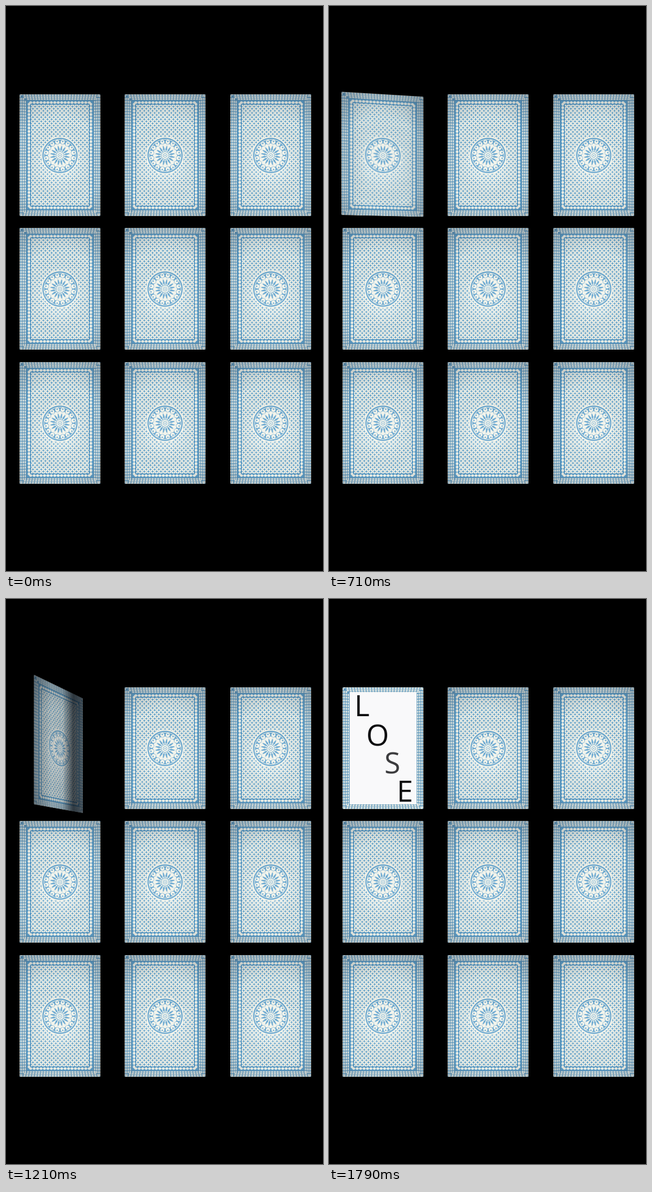
These frames come from a looping animation (561 px wide and 998 px high, 1830 ms). An HTML page with a canvas:

```html
<!DOCTYPE html>
<html lang="en">
<head>
<meta charset="utf-8">
<title>Card flip</title>
<style>
  html, body { margin: 0; width: 100%; height: 100%; overflow: hidden; background: #000; }
  #stage {
    position: relative; width: 561px; height: 998px; overflow: hidden; background: #000;
    perspective: 1050px; perspective-origin: 280.5px 499px;
  }
  .card { position: absolute; width: 143px; height: 215px; }
  .card canvas, .side, .shade, svg { position: absolute; left: 0; top: 0; width: 143px; height: 215px; }
  .side { backface-visibility: hidden; border-radius: 1px; overflow: hidden; }
  #flip { transform-style: preserve-3d; }
  #front { transform: rotateY(180deg); }
  text { font: 51.5px "Open Sans", "Noto Sans", sans-serif; fill: #0c0c0e; }
</style>
</head>
<body>
<div id="stage">
  <div id="flip" class="card">
    <div id="back" class="side"><div class="shade"></div></div>
    <div id="front" class="side">
      <svg viewBox="0 0 143 215">
        <text x="21" y="51">L</text>
        <text x="42" y="102.5">O</text>
        <text x="74" y="152" style="fill:#3c3c3e">S</text>
        <text x="96" y="201.5">E</text>
      </svg>
      <div class="shade"></div>
    </div>
  </div>
</div>
<script>
const W = 143, H = 215, SCALE = 2;
const BLUE = '#5b9fcb', CREAM = '#f2f3e9';
const COLS = [24, 210, 396.5], ROWS = [155.5, 392, 628.5];
const LOOP = 1830, FRAME = 1000 / 24, START = 360, END = 1790;
const $ = id => document.getElementById(id);

function makeCanvas(paint) {
  const c = document.createElement('canvas');
  c.width = W * SCALE;
  c.height = H * SCALE;
  const g = c.getContext('2d');
  g.scale(SCALE, SCALE);
  paint(g);
  return c;
}

// Leaf from one point to another, bulging by b on each side.
function leaf(g, x1, y1, x2, y2, b) {
  const mx = (x1 + x2) / 2, my = (y1 + y2) / 2;
  const len = Math.hypot(x2 - x1, y2 - y1);
  const nx = (y1 - y2) / len * b, ny = (x2 - x1) / len * b;
  g.beginPath();
  g.moveTo(x1, y1);
  g.quadraticCurveTo(mx + nx, my + ny, x2, y2);
  g.quadraticCurveTo(mx - nx, my - ny, x1, y1);
  g.fill();
}

function disc(g, x, y, r, color) {
  g.fillStyle = color;
  g.beginPath();
  g.arc(x, y, r, 0, Math.PI * 2);
  g.fill();
}

function ring(g, r, width, color) {
  g.strokeStyle = color;
  g.lineWidth = width;
  g.beginPath();
  g.arc(0, 0, r, 0, Math.PI * 2);
  g.stroke();
}

// Row of leaves running round the card, dx and dy from its edges.
function chain(g, dx, dy, pitch, bulge, shift = 0) {
  g.fillStyle = CREAM;
  const w = W - 2 * dx, h = H - 2 * dy;
  const nx = Math.round(w / pitch), ny = Math.round(h / pitch);
  for (let i = 0; i < nx; i++) {
    const x = dx + (i + shift) * w / nx, e = x + w / nx;
    leaf(g, x, dy, e, dy, bulge);
    leaf(g, x, H - dy, e, H - dy, bulge);
  }
  for (let i = 0; i < ny; i++) {
    const y = dy + (i + shift) * h / ny, e = y + h / ny;
    leaf(g, dx, y, dx, e, bulge);
    leaf(g, W - dx, y, W - dx, e, bulge);
  }
}

function border(g) {
  g.fillStyle = '#6299bd';
  g.fillRect(0, 0, W, H);
  chain(g, .8, .8, 5, 1.8);
  chain(g, 3.8, 3.2, 5, 2.2, .5);
  chain(g, 7, 5.9, 5, 2.2);
  chain(g, 10.2, 8.6, 5, 2.2, .5);
}

function lattice(g) {
  const x0 = 20, y0 = 18, w = 103, h = 179, nx = 14, ny = 24;
  const px = w / nx, py = h / ny, bulge = px * .39;
  g.save();
  g.beginPath();
  g.rect(x0, y0, w, h);
  g.clip();
  g.fillStyle = BLUE;
  g.fillRect(x0, y0, w, h);
  g.fillStyle = CREAM;
  for (let j = 0; j < ny * 2; j++) {
    for (let i = 0; i < nx * 2; i++) {
      const x = x0 + i * px / 2, y = y0 + j * py / 2;
      const rise = (i + j) % 2 * py / 2;
      leaf(g, x, y + rise, x + px / 2, y + py / 2 - rise, bulge);
    }
  }
  g.restore();
}

function medallion(g) {
  g.save();
  g.translate(71.5, 108);
  disc(g, 0, 0, 33.4, CREAM);
  disc(g, 0, 0, 31.2, BLUE);
  ring(g, 28.4, 1, CREAM);
  for (let i = 0; i < 16; i++) {
    g.save();
    g.rotate(i * Math.PI / 8);
    g.fillStyle = CREAM;
    leaf(g, 5.5, 0, 11.5, 0, 2);
    g.beginPath();
    g.moveTo(9.5, 0);
    g.lineTo(18, -3);
    g.arc(18.4, 0, 3, -Math.PI / 2, Math.PI / 2);
    g.fill();
    g.rotate(Math.PI / 16);
    disc(g, 24.3, 0, 3.7, CREAM);
    disc(g, 25.4, 0, 1.3, BLUE);
    g.fillStyle = CREAM;
    leaf(g, 16, 0, 22, 0, 1.6);
    g.restore();
  }
  disc(g, 0, 0, 6, CREAM);
  ring(g, 3.4, .8, BLUE);
  disc(g, 0, 0, 1, BLUE);
  g.restore();
}

function paintBack(g) {
  border(g);
  g.fillStyle = BLUE;
  g.fillRect(13.2, 11.3, W - 26.4, H - 22.6);
  chain(g, 16.7, 14.6, 6, 4.6);
  lattice(g);
  g.strokeStyle = '#4c92c2';
  g.lineWidth = 1.2;
  g.strokeRect(19.6, 17.6, 103.8, 179.8);
  medallion(g);
  const light = g.createRadialGradient(70, 122, 30, 70, 118, 138);
  light.addColorStop(0, 'rgba(255,255,255,.14)');
  light.addColorStop(.45, 'rgba(60,70,80,.02)');
  light.addColorStop(1, 'rgba(30,45,60,.28)');
  g.fillStyle = light;
  g.fillRect(0, 0, W, H);
}

function paintFront(g) {
  border(g);
  g.fillStyle = '#f9f9fa';
  g.fillRect(12.5, 8.5, 118.5, 198);
}

function place(el, x, y) {
  el.style.left = x + 'px';
  el.style.top = y + 'px';
}

// Black veil across a side; stops are [position %, opacity].
function veil(side, stops) {
  const list = stops.map(([at, a]) => `rgba(4,8,14,${Math.min(.85, a).toFixed(3)}) ${at}%`);
  side.querySelector('.shade').style.background = `linear-gradient(90deg, ${list.join(',')})`;
}

function draw(time) {
  const step = Math.floor((time % LOOP + 1.7) / FRAME);
  const p = Math.min(1, Math.max(0, (step * FRAME - START) / (END - START)));
  const angle = 180 * p * p;
  $('flip').style.transform = `rotateY(${angle}deg)`;
  const k = Math.min(1, angle / 90), m = Math.min(1, (180 - angle) / 90);
  veil($('back'), [
    [0, .55 * k],
    [32, .35 * k * k],
    [55, .4 * k * k],
    [78, 1.45 * k * k],
    [100, .78 * k]
  ]);
  veil($('front'), [
    [0, 1.2 * m],
    [35, .8 * m * m],
    [60, .5 * m ** 3],
    [100, .2 * m + .5 * m ** 3]
  ]);
}

for (const y of ROWS) {
  for (const x of COLS) {
    if (x === COLS[0] && y === ROWS[0]) continue;
    const card = document.createElement('div');
    card.className = 'card';
    card.append(makeCanvas(paintBack));
    place(card, x, y);
    $('stage').append(card);
  }
}
place($('flip'), COLS[0], ROWS[0]);
$('back').prepend(makeCanvas(paintBack));
$('front').prepend(makeCanvas(paintFront));

const began = performance.now();
function tick() {
  draw(performance.now() - began);
  requestAnimationFrame(tick);
}
tick();
</script>
</body>
</html>
```
